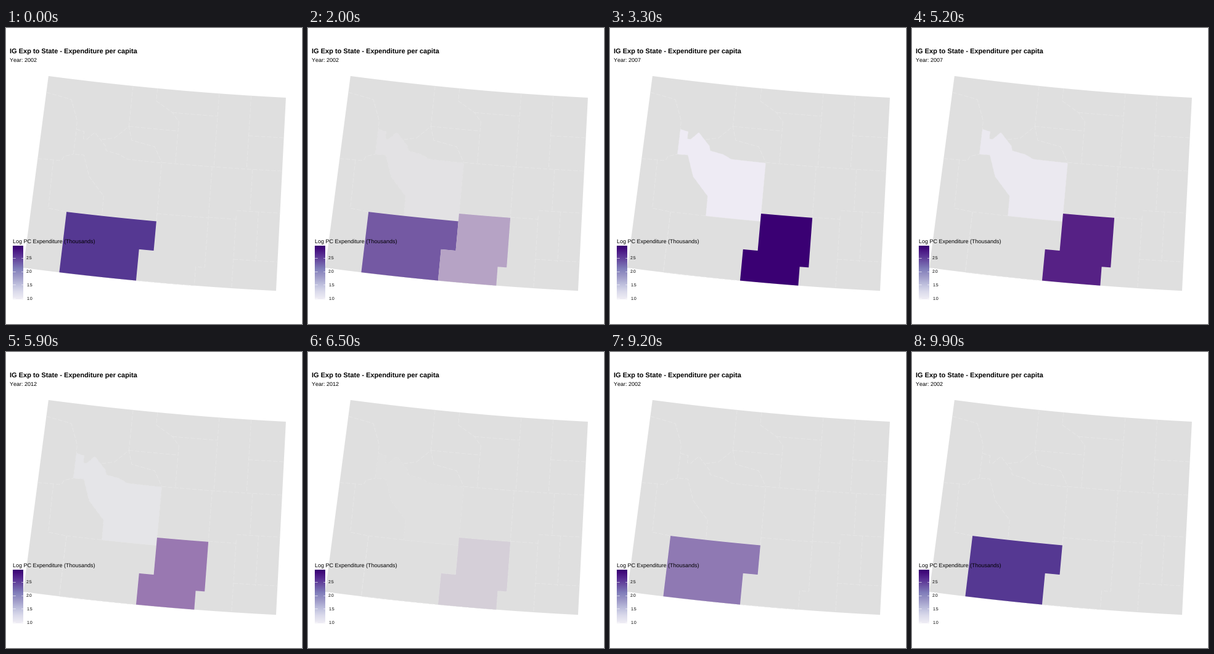
These frames come from a looping animation (480 px wide and 480 px high, 10 s). A matplotlib script:

```python
import numpy as np
import matplotlib.pyplot as plt
from matplotlib.animation import FuncAnimation
from matplotlib.colors import LinearSegmentedColormap, to_rgb
from matplotlib.patches import Polygon

SIZE, DPI = 480, 100
PX = 72 / DPI  # points per pixel
FRAMES, STEP = 100, 100

plt.rcParams["font.family"] = "Liberation Sans"
plt.rcParams["text.hinting"] = "none"
plt.rcParams["text.hinting_factor"] = 1

LAND, BORDER = "#dfdfdf", "#e7e7e7"
PURPLES = ["#efedf5", "#dadaeb", "#bcbddc", "#9e9ac8",
           "#807dba", "#6a51a3", "#54278f", "#3a0073"]
BEND = np.array([0.06, 0.2, 0.05])  # how far each channel runs ahead in a fade

# Degrees west and north of the state's edges and shared county lines
WEST, EAST, NORTH, SOUTH = 111.05, 104.05, 45, 41
LINCOLN, NATRONA, ALBANY = 110.05, 107.51, 106.06
MIDDLE = 43.48


def project(points):
    """Conic projection of (lon, lat) points, with each side subdivided."""
    points = np.array(points, float)
    at = np.linspace(0, len(points) - 1, 12 * (len(points) - 1) + 1)
    lon, lat = (np.interp(at, range(len(points)), c) for c in points.T)
    angle = np.radians(2.92 + 0.653 * (lon - EAST))
    radius = 4847 + 78.4 * (NORTH - lat)
    return np.column_stack([700.8 - radius * np.sin(angle),
                            radius * np.cos(angle) - 4727.7])


def stairs(lons, lats):
    """Closed outline whose sides follow parallels and meridians in turn."""
    path = []
    for i, lat in enumerate(lats):
        path += [(lons[i], lat), (lons[(i + 1) % len(lons)], lat)]
    return path + path[:1]


state = stairs([WEST, EAST], [NORTH, SOUTH])
sweetwater = stairs([LINCOLN, NATRONA, 107.92], [42.26, 41.65, SOUTH])
carbon = stairs([NATRONA, ALBANY, 106.31, 107.92], [42.42, 41.39, SOUTH, 41.65])
fremont = [(LINCOLN, 43.98), (109.82, 43.95), (109.82, 43.8), (109.72, 43.8),
           (109.51, 43.96), (109.16, 43.7), (109.13, 43.61), (108.74, 43.56),
           (108.5, 43.48), (NATRONA, 43.47), (NATRONA, 42.26), (109.05, 42.26),
           (109.06, 42.67), (109.53, 43.04), (109.75, 43.47),
           (LINCOLN, 43.46), (LINCOLN, 43.98)]

# Straight county lines: position, then the two ends
MERIDIANS = [(LINCOLN, 42.26, SOUTH), (108.55, NORTH, 44.16),
             (107.12, 44.35, MIDDLE), (106.01, NORTH, MIDDLE),
             (105.07, NORTH, MIDDLE), (ALBANY, MIDDLE, 42.42),
             (104.9, MIDDLE, 42.61), (105.28, 42.5, SOUTH),
             (104.66, 42.61, 41.57)]
PARALLELS = [(44.16, 108.55, 107.12), (44.53, 107.33, 106.01),
             (44.17, 105.07, EAST), (MIDDLE, NATRONA, EAST),
             (42.43, ALBANY, 105.28), (42.61, 105.28, EAST),
             (41.6, 105.28, EAST)]
# Lines along rivers and ridges
NATURAL = [
    [(WEST, 44.66), (110.3, 44.58), (110.06, 44.16), (LINCOLN, 43.98)],
    [(WEST, 43.28), (110.37, 43.3), (110.3, 43.4), (LINCOLN, 43.46)],
    [(110.6, 43.29), (110.57, 42.29), (LINCOLN, 42.26)],
    [(107.83, NORTH), (107.83, 44.74), (107.33, 44.53), (107.12, 44.35)],
    [(109.29, 43.83), (108.93, 43.89), (108.55, 44.16), (108.43, 43.88),
     (107.75, 43.79), (NATRONA, MIDDLE)],
]

fig = plt.figure(figsize=(SIZE / DPI, SIZE / DPI), dpi=DPI, facecolor="white")
ax = fig.add_axes([0, 0, 1, 1])
ax.set_axis_off()


def shape(path, color, z):
    return ax.add_patch(Polygon(project(path), facecolor=color,
                                linewidth=0, zorder=z))


def label(x, y, text, px, **kw):
    return ax.text(x, y, text, fontsize=px * PX, color="black", zorder=8,
                   va="baseline", **kw)


# Map
shape(state, LAND, 1)
lines = NATURAL + [sweetwater, carbon, fremont]
lines += [[(lon, a), (lon, b)] for lon, a, b in MERIDIANS]
lines += [[(a, lat), (b, lat)] for lat, a, b in PARALLELS]
for line in lines:
    ax.plot(*project(line).T, color=BORDER, lw=0.9 * PX, zorder=2,
            linestyle=(0, (8, 3)), dash_capstyle="butt")

# County shape, its full colour and the year it belongs to
counties = [(shape(path, color, 3), np.array(to_rgb(color)), when)
            for path, color, when in [(fremont, "#eeebf4", 2007),
                                      (sweetwater, "#553892", 2002),
                                      (carbon, PURPLES[-1], 2007)]]

# Titles and legend
label(6.5, 42, "IG Exp to State - Expenditure per capita", 10.8, weight="bold")
year = label(6.5, 55, "", 9)
label(11, 349, "Log PC Expenditure (Thousands)", 9)
ramp = LinearSegmentedColormap.from_list("purples", PURPLES)
ax.imshow(np.linspace(1, 0, 87)[:, None], cmap=ramp, aspect="auto",
          interpolation="nearest", extent=(11, 28, 440, 353), zorder=6)
for i in range(4):
    y = 438.3 - 21.9 * i
    label(33, y + 2.6, f"{1 + i / 2:.1f}", 7.2)
    for x in (11, 24.5):
        ax.plot([x, x + 3.5], [y, y], color="white", lw=0.6 * PX, zorder=7)

ax.set_xlim(0, SIZE)
ax.set_ylim(SIZE, 0)

# Last still frame, length of the change, year before, year after
CHANGES = [(16, 17, 2002, 2007), (49, 17, 2007, 2012), (83, 16, 2012, 2002)]


def weights(frame):
    """Share of each year on show, and the year nearest to it."""
    share, near = {2002: 1}, 2002
    for start, length, old, new in CHANGES:
        if frame > start:
            p = min((frame - start) / length, 1)
            share = {old: 1 - p, new: p}
            near = new if frame - start > (length + 1) // 2 else old
    return share, near


def draw(frame):
    share, near = weights(frame)
    land = np.array(to_rgb(LAND))
    for patch, color, when in counties:
        a = share.get(when, 0)
        patch.set_visible(a > 0)
        patch.set_facecolor(land + (color - land) * (a + BEND * a * (1 - a)))
    year.set_text(f"Year: {near}")
    return [c[0] for c in counties] + [year]


anim = FuncAnimation(fig, draw, frames=FRAMES, interval=STEP,
                     init_func=lambda: draw(0), repeat=True, repeat_delay=0)
plt.show()
```
